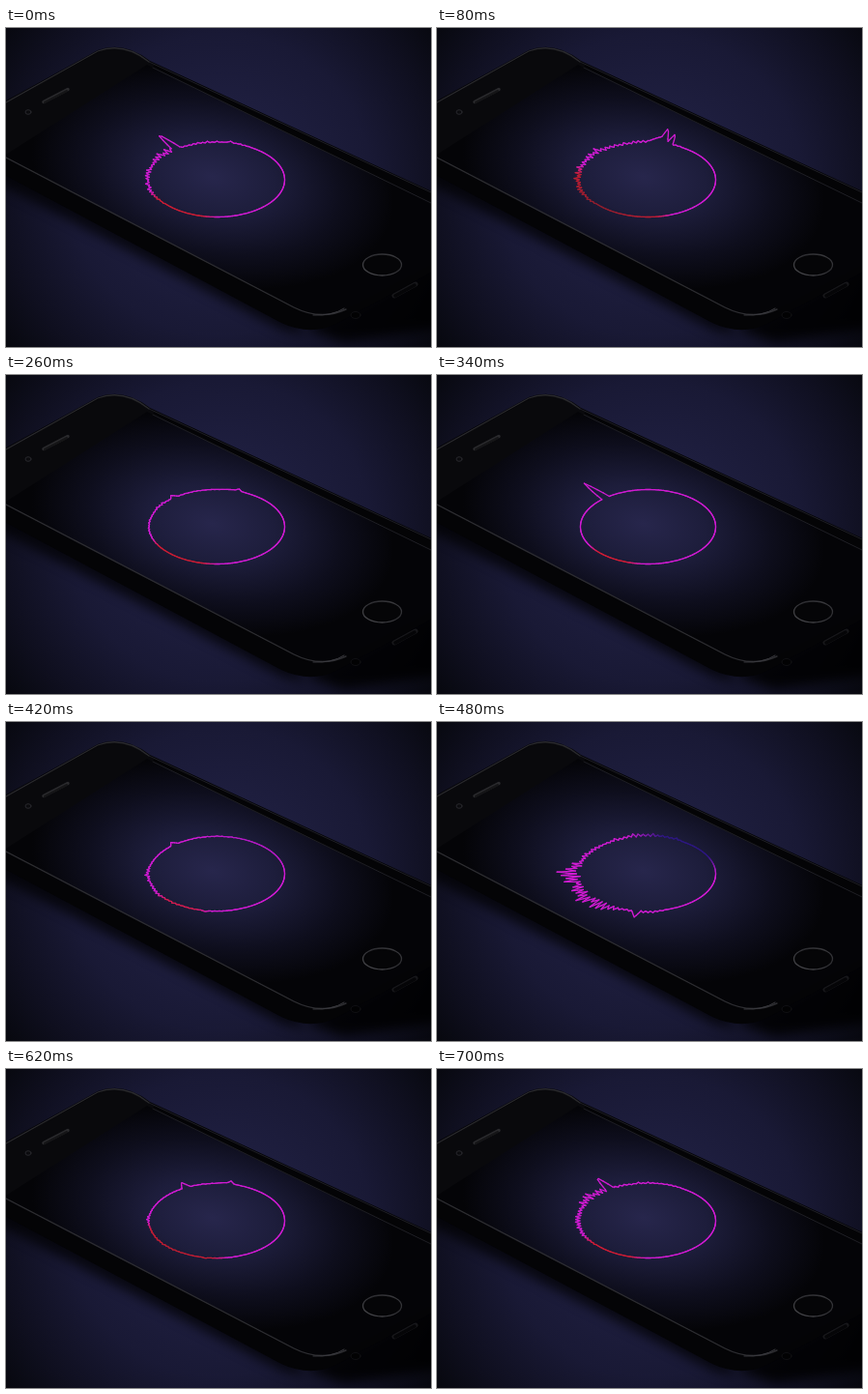
Write an HTML page with a canvas that moves like this. It is 440 by 330 pixels and loops after 0.72 s.

```html
<!DOCTYPE html>
<html lang="en">
<head>
<meta charset="utf-8">
<title>Sound ring</title>
<style>
  html, body { margin: 0; width: 100%; height: 100%; overflow: hidden; background: #06070c; }
  svg, canvas { position: absolute; left: 0; top: 0; width: 440px; height: 330px; }
</style>
</head>
<body>
<svg viewBox="0 0 440 330">
  <defs>
    <radialGradient id="room" gradientUnits="userSpaceOnUse" cx="222" cy="162" r="285">
      <stop offset="0" stop-color="#24244a"/>
      <stop offset=".55" stop-color="#191935"/>
      <stop offset=".8" stop-color="#0f0f1f"/>
      <stop offset="1" stop-color="#06070c"/>
    </radialGradient>
    <radialGradient id="glow" gradientUnits="userSpaceOnUse" cx="0" cy="0" r="1"
      gradientTransform="translate(214 154) rotate(12) scale(190 112)">
      <stop offset="0" stop-color="#27264c"/>
      <stop offset=".35" stop-color="#1d1d3b"/>
      <stop offset=".7" stop-color="#0e0e1d"/>
      <stop offset="1" stop-color="#040407"/>
    </radialGradient>
    <linearGradient id="button" x1="0" y1="1" x2="1" y2="0">
      <stop offset="0" stop-color="#4a4a4e"/>
      <stop offset=".6" stop-color="#2c2c30"/>
      <stop offset="1" stop-color="#3c3c40"/>
    </linearGradient>
    <filter id="soft" x="-20%" y="-20%" width="140%" height="140%"><feGaussianBlur stdDeviation="6"/></filter>
    <clipPath id="face"><path d="M-5 80L96 25Q122 14 147 35L445 180V242L352 291Q330 302 300 290L-5 133Z"/></clipPath>
  </defs>
  <rect width="440" height="330" fill="url(#room)"/>
  <g fill="#020205" filter="url(#soft)">
    <path d="M-10 130L290 286L310 318L285 312L-10 160Z" opacity=".7"/>
    <path d="M310 312L455 235V310L350 325Z" opacity=".85"/>
  </g>
  <path d="M-5 78L95 23Q122 13 149 34L445 171V250L342 306Q315 319 285 305L-5 150Z" fill="#040406"/>
  <g clip-path="url(#face)">
    <path d="M-5 140V70L110 10L160 35Z" fill="#09090c"/>
    <path d="M-5 134L146 38L445 184V250L330 305L300 290Z" fill="url(#glow)"/>
  </g>
  <g fill="none" stroke-linecap="round">
    <path d="M0 77L95 24Q122 14 148 35" stroke="#29292d" stroke-width="1.300"/>
    <path d="M148 35L440 170M152 41L440 181" stroke="#1e1e24"/>
    <path d="M0 134L298 289Q326 303 352 291" stroke="#2d2d31" stroke-width="1.400"/>
    <path d="M318 297Q338 298 350 290" stroke="#3a3a3f"/>
    <path d="M39 76.500L64 63.500" stroke="#2a2a2d" stroke-width="3.500"/>
    <path d="M40 77L63 65" stroke="#151517" stroke-width="2"/>
    <ellipse cx="23" cy="87" rx="3" ry="2.300" fill="#0b0b0e" stroke="#28282d"/>
    <ellipse cx="389.500" cy="245" rx="20" ry="11" fill="#050507" stroke="url(#button)" stroke-width="1.300"/>
    <path d="M402 277L424 265" stroke="#17171a" stroke-width="5"/>
    <path d="M403 277L423 266" stroke="#050507" stroke-width="3.500"/>
    <ellipse cx="362" cy="297" rx="5" ry="3.500" fill="#020203" stroke="#151518" stroke-width=".8"/>
  </g>
</svg>
<canvas id="ring" width="440" height="330"></canvas>
<script>
const LOOP = 720, CX = 218.5, CY = 157, RX = 70, RY = 38.5;
const MAGENTA = [208, 28, 210], RED = [208, 30, 54], DARK = [104, 32, 42], BLUE = [46, 24, 128];
const ctx = document.getElementById('ring').getContext('2d');

const mix = (a, b, k) => a + (b - a) * k;
const blend = (a, b, k) => a.map((v, i) => mix(v, b[i], k));
const clamp = v => Math.max(0, Math.min(1, v));
const spike = (a, c, w) => clamp(1 - Math.abs(a - c) / w);
const hill = (a, c, w) => Math.sqrt(spike(a, c, w));

// soft beat in time that wraps round the loop
function beat(t, at, width) {
  const d = Math.abs(t - at);
  return Math.exp(-((Math.min(d, LOOP - d) / width) ** 2));
}

const rand = (i, seed) => {
  const v = Math.sin(i * 127.1 + seed * 311.7) * 43758.5453;
  return v - Math.floor(v);
};

// alternating long and short teeth, two degrees apart
function saw(a, seed) {
  const i = Math.floor(a / 2);
  const tooth = n => n % 2 ? .4 + .6 * rand(n, seed) : .22 * rand(n, seed);
  return mix(tooth(i), tooth(i + 1), a / 2 - i);
}

// strength of each part of the sound at time t
function listen(t) {
  const wide = beat(t, 130, 100) + beat(t, 565, 60);
  return {
    tip: .5 * beat(t, 0, 40) + .5 * beat(t, 340, 60) + .42 * beat(t, 570, 50),
    tipAt: 231 + 12 * beat(t, 630, 80),
    horn: .4 * beat(t, 85, 60) + .32 * beat(t, 185, 60) + .52 * beat(t, 560, 45),
    hornAt: 281 + 12 * beat(t, 200, 80),
    prong: .3 * beat(t, 85, 50),
    fringe: .07 * beat(t, 0, 40) + .22 * beat(t, 80, 55) + .16 * beat(t, 180, 70) + .14 * beat(t, 690, 40),
    bass: .6 * beat(t, 515, 65),
    wide,
    blue: beat(t, 480, 45)
  };
}

function reach(s, a, seed) {
  const peak = Math.max(
    s.tip * spike(a, s.tipAt, 4),
    s.horn * spike(a, s.hornAt, 4),
    s.horn * .4 * spike(a, s.hornAt - 3, 12),
    s.prong * spike(a, s.hornAt + 6, 3),
    s.bass * .4 * spike(a, 100, 4));
  const teeth = Math.max(
    s.bass * hill(a, 180, 17),
    s.bass * .75 * hill(a, 146, 28),
    s.bass * .3 * hill(a, 160, 85),
    s.fringe * hill(a, 218, 22),
    s.fringe * .5 * hill(a, 205, 65),
    (s.fringe + s.bass) * .25 * hill(a, 262, 40));
  return Math.max(peak, teeth * saw(a, seed));
}

function colour(s, a) {
  const inside = 28 + 50 * s.wide - Math.abs(a - 124 - 16 * s.wide);
  const core = blend(RED, DARK, s.wide * .8 * clamp(inside / 60));
  const warm = blend(MAGENTA, core, (1 - s.blue) * clamp(inside / 14));
  const cold = s.blue * clamp((55 - Math.abs(a - 308)) / 30);
  return `rgb(${blend(warm, BLUE, cold).map(Math.round)})`;
}

function draw(time) {
  const t = time < 40 ? 0 : Math.floor(time / 20) * 20;
  const s = listen(t), seed = t / 20 + 1;
  const point = a => {
    const r = 1 + reach(s, a, seed), q = a * Math.PI / 180;
    return [CX + RX * r * Math.cos(q), CY + RY * r * Math.sin(q)];
  };

  ctx.clearRect(0, 0, 440, 330);
  ctx.lineWidth = 1.3;
  ctx.lineCap = ctx.lineJoin = 'round';
  let last = point(0);
  for (let a = 1; a <= 360; a++) {
    const next = point(a % 360);
    ctx.strokeStyle = colour(s, a);
    ctx.beginPath();
    ctx.moveTo(...last);
    ctx.lineTo(...next);
    ctx.stroke();
    last = next;
  }
}

const start = performance.now();
function tick() {
  draw((performance.now() - start) % LOOP);
  requestAnimationFrame(tick);
}
tick();
</script>
</body>
</html>
```
